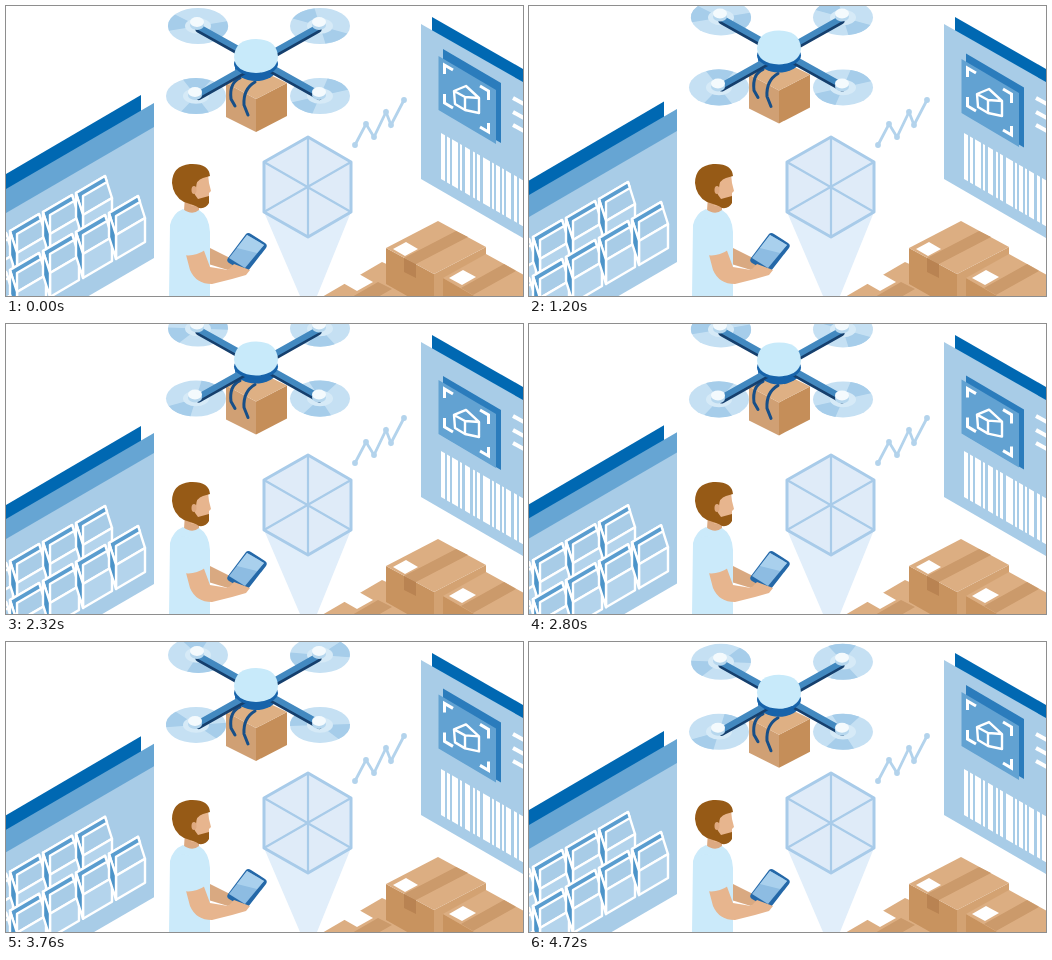
Recreate the animation shown at these times as an HTML page. Size 517 by 290 pixels, loop 4.8 s.

```html
<!DOCTYPE html>
<html lang="en">
<head>
<meta charset="utf-8">
<title>Smart logistics</title>
<style>
html, body { margin: 0; width: 100%; height: 100%; overflow: hidden; background: #fff; }
svg { display: block; width: 100vw; height: 100vh; }
</style>
</head>
<body>
<svg viewBox="0 0 517 290" preserveAspectRatio="none">
  <!-- left panel -->
  <path id="backPanel" fill="#0068b2" d="M0 168L135 89V200L0 278Z"/>
  <path id="midPanel" fill="#66a5d3" d="M0 183L148 97V200L0 286Z"/>
  <path id="frontPanel" fill="#a8cce7" d="M0 207L148 121V252L0 338Z"/>
  <g id="cubes" stroke="#fff" stroke-width="2.4" stroke-linejoin="round"></g>

  <!-- right panel -->
  <path fill="#0068b2" d="M426 11L517 63V150L426 100Z"/>
  <path fill="#a8cce7" d="M415 18L517 76V232L415 173Z"/>
  <path id="tileShade" fill="#2b7cbc" d="M437 43L495 77V137L437 103Z"/>
  <g id="tile" fill="none" stroke="#fff" stroke-width="3">
    <path fill="#62a2d2" stroke="none" d="M432.500 50L490 84V138L432.500 104Z"/>
    <path d="M438.500 68V59L447 64M474 80L482.500 85V94M438.500 88V97L447 102M474 121L482.500 126V117"/>
    <path stroke-width="2.400" stroke-linejoin="round" d="M448 85L460 80L473 92V107L459 104L449 98ZM448 85L459 91L473 92M459 91V104"/>
  </g>
  <path fill="none" stroke="#fff" stroke-width="4" d="M507 92L518 98M507 106L518 112M507 119L518 125"/>
  <g id="bars" fill="#fff"></g>

  <!-- line chart -->
  <g id="chart" fill="#b3d3ec"></g>

  <!-- hologram -->
  <path fill="#e1eefa" d="M258 206L302 231L345 206L311 290H294Z"/>
  <path fill="#dfebf8" stroke="#a8cbe9" stroke-width="3" stroke-linejoin="round" d="M302 131L345 156V206L302 231L258 206V156Z"/>
  <path fill="none" stroke="#a8cbe9" stroke-width="2.200" d="M302 131V231M258 156L345 206M345 156L258 206"/>

  <!-- parcels -->
  <path fill="#dcae82" d="M316 291L376 256L425 278V291Z"/>
  <path fill="#cb9a6b" d="M372 276L386 283L372 291H346Z"/>
  <path fill="#fff" d="M337 277L353 268L367 276L351 285Z"/>
  <path fill="#c8935f" d="M380 242L428 268V291H403L380 278Z"/>
  <path fill="#d3a272" d="M428 268L480 241V291H428Z"/>
  <path fill="#dcae82" d="M380 242L432 215L480 241L428 268Z"/>
  <path fill="#cb9a6b" d="M450 225L462 231L410 258L398 252Z"/>
  <path fill="#b98352" d="M398 252L410 258V272L398 266Z"/>
  <path fill="#fff" d="M387 243L400 236L412 243L399 250Z"/>
  <path fill="#c8935f" d="M437 272L470 291H437Z"/>
  <path fill="#dcae82" d="M437 272L480 248L518 269V291H470Z"/>
  <path fill="#cb9a6b" d="M498 258L510 265L467 289L455 282Z"/>
  <path fill="#fff" d="M443 272L457 264L470 271L456 279Z"/>

  <!-- worker -->
  <path fill="#d9a981" d="M200 240L224 252L231 260L222 264L199 257Z"/>
  <path fill="#dca981" d="M179 190H193V206L186 212L178 205Z"/>
  <path fill="#cbeafa" d="M177 203Q186 210 193 204Q203 210 204 226V291H163L164 219Q167 207 177 203Z"/>
  <path fill="#e7b58e" d="M185 168H202L203 177L205 185L203 187V196L195 200H185Z"/>
  <path fill="#965a16" d="M166 177Q166 160 184 158Q203 157 204 170L197 172Q190 174 190 182L188 190L190 200L178 196Q167 190 166 177Z"/>
  <path fill="#965a16" d="M187 186L192 193L203 190V197Q200 203 193 202L185 197Z"/>
  <ellipse cx="188" cy="184" rx="2.500" ry="4" fill="#dfa97f"/>
  <path fill="#2468a8" d="M222 252L240 228Q242 226 245 228L259 237Q262 239 260 242L242 265Q240 267 237 265L223 257Q220 255 222 252Z"/>
  <path fill="#8dbce2" d="M223 252L241 229L258 239L239 262Z"/>
  <path fill="#a9d0ed" d="M231 242L241 229L258 239L251 247Z"/>
  <path fill="#e7b58e" d="M179 245L197 242L204 261L222 264L228 258L244 264L240 269L226 273L206 278Q190 278 184 264Z"/>
  <path fill="#cbeafa" d="M166 216Q180 207 190 219L199 244Q189 251 177 249Z"/>

  <!-- drone -->
  <g id="drone">
    <path fill="#d0a074" d="M220 77L250 93V126L220 111Z"/>
    <path fill="#c58e59" d="M250 93L281 77V110L250 126Z"/>
    <path fill="#deb084" d="M220 77L250 62L281 77L250 93Z"/>
    <path fill="none" stroke="#174f88" stroke-width="3" stroke-linecap="round" d="M234 72Q223 77 225 93L229 100M249 76Q237 83 238 99L242 109"/>
    <g id="rotors"></g>
    <ellipse cx="250" cy="62" rx="21" ry="13" fill="#1763aa"/>
    <g fill="none" stroke-linecap="round">
      <path stroke="#153f6d" stroke-width="7" d="M193 23.500L313 90.500M312 23.500L193 90.500"/>
      <path stroke="#4389c0" stroke-width="6" d="M193 21L313 88M312 21L193 88"/>
    </g>
    <g id="caps"></g>
    <ellipse cx="250" cy="58" rx="22" ry="12" fill="#1763aa"/>
    <path fill="#c8eafa" d="M228 51Q229 33 250 33Q271 33 272 51Q271 66 250 67Q229 66 228 51Z"/>
  </g>
</svg>
<script>
const LOOP = 4800, STEP = 80;
const $ = id => document.getElementById(id);

function add(parent, tag, attrs) {
  const node = document.createElementNS('http://www.w3.org/2000/svg', tag);
  for (const k in attrs) node.setAttribute(k, attrs[k]);
  return parent.appendChild(node);
}

// Open box seen from above; (x, y) is its top corner.
function cube(x, y) {
  const face = (fill, pts) => add($('cubes'), 'polygon', {
    fill, points: pts.map(([dx, dy]) => `${x + dx},${y + dy}`).join(' ')
  });
  const left = [-29, 17], right = [7, 22], mid = [-22, 39];
  face('#a8cce7', [left, [0, 0], right, mid]);
  face('#5a9dcf', [left, [0, 0], [2, 6], [-22, 20], [-22, 39]]);
  face('#b4d4ec', [mid, right, [7, 46], [-22, 63]]);
  face('#4c94c9', [left, mid, [-22, 63], [-29, 41]]);
}

for (let row = 0; row < 5; row++)
  for (let i = 5; i >= 0; i--) {
    const x = 99 + (row ? 33 : 0) - 33 * i;
    const y = 170 + 19 * i + (row ? 20 + 39 * (row - 1) : 0);
    const inside = row < 2 || i >= row - 1;
    if (inside && y - 190 < (132 - x) * 0.58 + 5) cube(x, y);
  }

let barX = 435;
for (const [w, gap] of [[4, 2], [3, 2], [6, 2], [2, 3], [5, 3], [2, 2], [3, 3], [7, 2], [2, 2], [4, 2], [2, 2], [5, 3], [3, 2], [6, 2]]) {
  const top = 127 + (barX - 435) * 0.577;
  add($('bars'), 'path', { d: `M${barX} ${top}l${w} ${w * 0.577}v46l${-w} ${-w * 0.577}Z` });
  barX += w + gap;
}

const trend = [[349, 139], [360, 118], [368, 131], [380, 106], [385, 119], [398, 94]];
add($('chart'), 'polyline', { points: trend.join(' '), fill: 'none', stroke: '#b3d3ec', 'stroke-width': 2.8 });
for (const [cx, cy] of trend) add($('chart'), 'circle', { cx, cy, r: 2.9 });

const blades = [[192, 20, 1], [314, 20, -1], [190, 90, -1], [314, 90, 1]].map(([x, y, dir]) => {
  const disc = add($('rotors'), 'g', { transform: `translate(${x} ${y}) scale(1 .6)` });
  add(disc, 'circle', { r: 30, fill: '#c5e0f3' });
  const blade = add(disc, 'path', { fill: '#a6cdea', d: 'M0 0L29 -8A30 30 0 0 1 23 19ZM0 0L-29 8A30 30 0 0 1 -23 -19Z' });
  add(disc, 'circle', { r: 13, fill: '#d6eaf7' });
  add($('caps'), 'ellipse', { cx: x - 1, cy: y - 1, rx: 7, ry: 5, fill: '#b6d7ee' });
  add($('caps'), 'ellipse', { cx: x - 1, cy: y - 4, rx: 7, ry: 5, fill: '#f4fafd' });
  return { blade, dir };
});

const shift = (id, y) => $(id).setAttribute('transform', `translate(0 ${y.toFixed(2)})`);

function draw(ms) {
  const t = Math.floor((ms % LOOP) / STEP) * STEP;
  const wave = (1 - Math.cos(2 * Math.PI * t / LOOP)) / 2;
  const lift = 0.75 * wave + 0.25 * Math.sin(Math.PI * t / LOOP);
  shift('drone', -15.5 * lift);
  shift('backPanel', 13 * wave);
  shift('midPanel', 12 * wave);
  shift('frontPanel', 8 * wave);
  shift('cubes', 12 * wave);
  shift('tileShade', 9 * wave);
  shift('tile', 6 * wave);
  blades.forEach(({ blade, dir }, i) =>
    blade.setAttribute('transform', `rotate(${dir * t * 0.45 + i * 40})`));
}

const start = performance.now();
function tick() {
  draw(performance.now() - start);
  requestAnimationFrame(tick);
}
draw(0);
tick();
</script>
</body>
</html>
```
